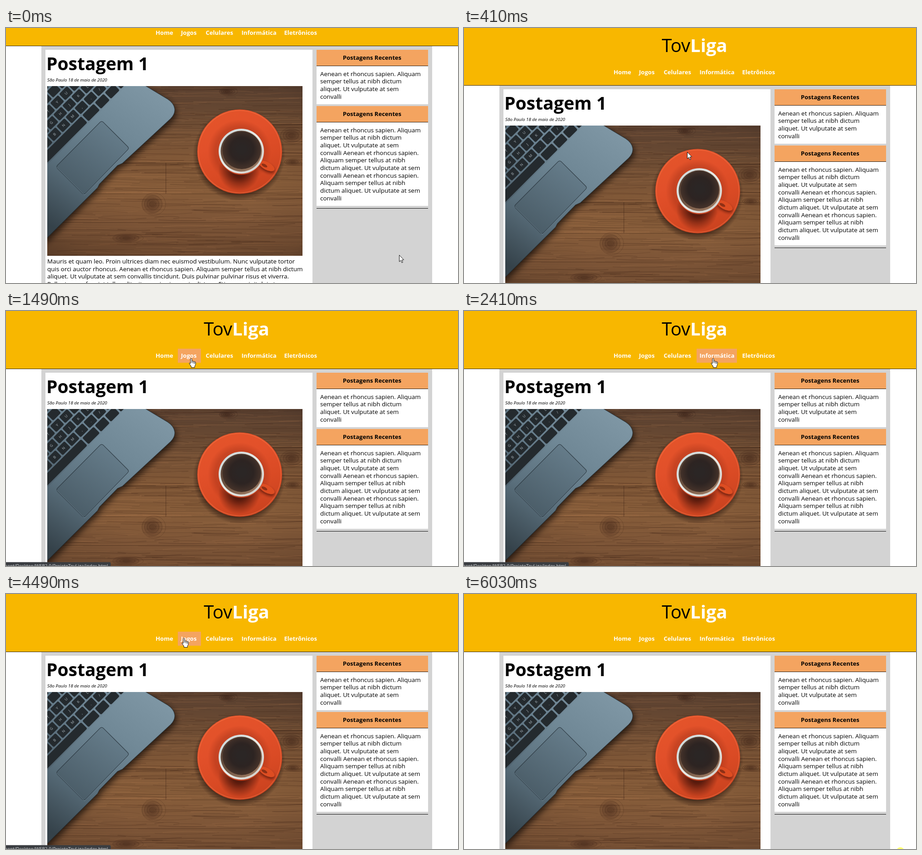
Write an HTML page with a canvas that moves like this. It is 997 by 562 pixels and loops after 6.11 s.

```html
<!DOCTYPE html>
<html lang="pt-BR">
<head>
<meta charset="utf-8">
<title>Blog</title>
<style>
  html, body { margin: 0; width: 100%; height: 100%; overflow: hidden; background: #fff; }
  canvas { display: block; }
</style>
</head>
<body>
<canvas id="stage" width="997" height="562"></canvas>
<script>
const W = 997, H = 562, LOOP = 6110, SCROLL = 88;
const SANS = '"Open Sans", "Noto Sans", sans-serif';
const SAND = '#f4a460';
const ctx = document.getElementById('stage').getContext('2d');

const NAV = [
  { label: 'Home', x: 330, left: 323, right: 375 },
  { label: 'Jogos', x: 386, left: 379, right: 430 },
  { label: 'Celulares', x: 440.5, left: 434, right: 509 },
  { label: 'Informática', x: 519.5, left: 513, right: 602 },
  { label: 'Eletrônicos', x: 613.5, left: 607, right: 695 }
];

// Pointer path: time, x, y
const PATH = [
  [0, 866.5, 499.5], [410, 492, 273], [640, 424, 140], [1000, 362, 112],
  [1330, 350, 104], [1410, 377, 104], [1490, 408, 104], [1640, 408, 104],
  [2030, 470, 103], [2100, 470, 103], [2410, 549, 104], [2560, 549, 104],
  [2870, 650, 105], [3110, 650, 105], [3570, 573, 97], [3800, 550, 97],
  [4490, 392, 97], [4650, 378, 97], [4725, 378, 97], [4800, 364, 97],
  [5340, 934, 461], [5800, 968, 575], [LOOP, 968, 575]
];

function box(g, color, x, y, w, h) {
  g.fillStyle = color;
  g.fillRect(x, y, w, h);
}

function text(g, str, x, y, font, color = '#000', align = 'left') {
  g.font = font + ' ' + SANS;
  g.fillStyle = color;
  g.textAlign = align;
  g.fillText(str, x, y);
}

function poly(g, pts) {
  g.beginPath();
  pts.forEach(([x, y]) => g.lineTo(x, y));
  g.closePath();
}

function oval(g, fill, x, y, rx, ry = rx, turn = 0) {
  g.beginPath();
  g.ellipse(x, y, rx, ry, turn, 0, Math.PI * 2);
  g.fillStyle = fill;
  g.fill();
}

function ring(g, color, width, x, y, rx, ry = rx) {
  g.beginPath();
  g.ellipse(x, y, rx, ry, 0, 0, Math.PI * 2);
  g.strokeStyle = color;
  g.lineWidth = width;
  g.stroke();
}

function addStops(grad, colors) {
  colors.forEach((c, i) => grad.addColorStop(i / (colors.length - 1), c));
  return grad;
}

function blend(g, x0, y0, x1, y1, ...colors) {
  return addStops(g.createLinearGradient(x0, y0, x1, y1), colors);
}

function glow(g, x, y, r0, r1, ...colors) {
  return addStops(g.createRadialGradient(x, y, r0, x, y, r1), colors);
}

function randomFrom(seed) {
  return () => (seed = (seed * 16807) % 2147483647) / 2147483647;
}

function drawWood(g) {
  const rnd = randomFrom(77);
  box(g, blend(g, 0, 216, 0, 590, '#5a4030', '#6b4b33', '#7f5737', '#875d3a', '#7d5537', '#6a472e'), 91, 216, 563, 374);
  for (let i = 0; i < 520; i++) {
    const x = 40 + rnd() * 580, y = 216 + rnd() * 374, len = 50 + rnd() * 190;
    g.strokeStyle = rnd() < 0.5 ? 'rgba(50,28,16,.2)' : 'rgba(178,126,80,.16)';
    g.lineWidth = 0.5 + rnd() * 1.6;
    g.beginPath();
    g.moveTo(x, y);
    g.quadraticCurveTo(x + len / 2, y + rnd() * 10 - 5, x + len, y + rnd() * 6 - 3);
    g.stroke();
  }
  [300, 385, 453, 516].forEach(y => box(g, 'rgba(45,24,14,.35)', 91, y, 563, 1.2));
  box(g, 'rgba(45,24,14,.4)', 352, 385, 1.2, 68);
  [[487, 228, 13, 6], [629, 325, 18, 12], [322, 476, 17, 16], [265, 551, 22, 7], [632, 383, 14, 5]].forEach(([x, y, rx, ry]) => {
    for (let k = 1; k < 5; k++) {
      oval(g, 'rgba(50,27,16,.12)', x, y, rx * k / 3, ry * k / 3);
      ring(g, 'rgba(45,24,14,.22)', 1, x + k, y, rx * k / 2.6, ry * k / 2.6);
    }
  });
  box(g, glow(g, 400, 410, 150, 420, 'rgba(25,16,12,0)', 'rgba(25,16,12,.08)', 'rgba(25,16,12,.34)'), 91, 216, 563, 374);
}

function bodyShape(g) {
  g.beginPath();
  g.moveTo(80, 200);
  g.lineTo(282, 200);
  g.lineTo(357, 245);
  g.bezierCurveTo(375, 257, 377, 274, 363, 288);
  g.lineTo(257, 386);
  g.lineTo(246, 391);
  g.lineTo(206, 432);
  g.lineTo(202, 440);
  g.lineTo(80, 561);
  g.closePath();
}

function drawKeys(g) {
  const rows = ['', '/.,MNBVC', ';LKJHGF', 'POIUYT', '0987', ''];
  g.save();
  poly(g, [[80, 200], [280, 200], [262, 217], [91, 389], [80, 400]]);
  g.fillStyle = blend(g, 262, 217, 91, 388, '#788f9e', '#667c8a', '#4d5f6b');
  g.fill();
  g.clip();
  g.translate(262, 218);
  g.rotate(Math.PI * 0.75);
  const key = (x, y, w, label) => {
    g.beginPath();
    g.roundRect(x, y, w, 19.5, 3);
    g.fillStyle = '#242a2e';
    g.fill();
    if (!label) return;
    g.save();
    g.translate(x + w / 2, y + 10);
    g.rotate(Math.PI);
    text(g, label, 0, 3, '8px', '#aab5bc', 'center');
    g.restore();
  };
  [[-18, 27], [13, 27], [44, 27], [75, 35], [114, 140]].forEach(([x, w]) => key(x, 3, w));
  rows.forEach((row, r) => {
    if (r === 0) return;
    const start = 31 - (r - 1) * 13, y = 3 + r * 23;
    key(start - 54, y, 50);
    for (let i = 0; i < 9; i++) key(start + i * 28, y, 24.5, row[i]);
  });
  g.restore();
}

function drawLaptop(g) {
  g.save();
  g.shadowColor = 'rgba(18,10,6,.75)';
  g.shadowBlur = 14;
  g.shadowOffsetX = 4;
  g.shadowOffsetY = 6;
  bodyShape(g);
  g.fillStyle = blend(g, 335, 225, 115, 535, '#7f97a5', '#708896', '#5a6f7c', '#35424a');
  g.fill();
  g.restore();
  g.strokeStyle = 'rgba(30,40,46,.7)';
  g.lineWidth = 1.2;
  g.stroke();
  drawKeys(g);

  const pad = [[211, 292], [272, 353], [172, 456], [110, 394]];
  g.beginPath();
  g.moveTo(240, 321);
  pad.forEach((p, i) => {
    const next = pad[(i + 1) % 4];
    if (i) g.arcTo(...p, ...next, 5);
  });
  g.arcTo(...pad[0], ...pad[1], 5);
  g.closePath();
  g.fillStyle = blend(g, 240, 300, 140, 440, '#677e8c', '#4a5c67');
  g.fill();
  g.strokeStyle = '#303d46';
  g.lineWidth = 1.2;
  g.stroke();
  g.strokeStyle = 'rgba(150,174,188,.45)';
  g.lineWidth = 1;
  g.beginPath();
  g.moveTo(271, 355);
  g.lineTo(173, 456);
  g.lineTo(112, 395);
  g.stroke();
}

function drawCup(g) {
  oval(g, glow(g, 514, 367, 84, 102, 'rgba(25,12,8,.65)', 'rgba(25,12,8,0)'), 514, 367, 102);
  oval(g, blend(g, 470, 270, 550, 453, '#e4542a', '#e2502a', '#d94a24', '#c9421f'), 515.5, 360.5, 93.5, 93);
  ring(g, 'rgba(255,140,90,.4)', 1.2, 515.5, 360.5, 91, 90.5);
  oval(g, glow(g, 515, 360, 54, 70, 'rgba(120,30,12,.25)', 'rgba(120,30,12,0)'), 515, 360, 70);
  oval(g, glow(g, 514, 402, 14, 46, 'rgba(70,20,10,.85)', 'rgba(70,20,10,0)'), 514, 402, 46);
  g.save();
  g.shadowColor = 'rgba(70,15,5,.7)';
  g.shadowBlur = 6;
  g.shadowOffsetY = 4;
  oval(g, '#dd4d22', 575, 392, 19, 8.5, 0.5);
  g.restore();
  oval(g, '#8f3015', 570, 391, 7, 3, 0.5);
  oval(g, '#c44422', 519, 361.5, 50, 50);
  oval(g, blend(g, 480, 320, 560, 400, '#cfd9da', '#e9ebe7', '#d3d0cb'), 519, 359.5, 50, 49.5);
  oval(g, blend(g, 480, 320, 545, 400, '#4d3b31', '#6d5240', '#9a7860'), 519, 359.5, 45.5, 45);
  oval(g, glow(g, 520, 355, 8, 44, '#2b2625', '#2d2422', '#46332a'), 520, 357.5, 42.5, 41.5);
}

function drawPhoto(g) {
  g.save();
  g.beginPath();
  g.rect(91, 216, 563, 374);
  g.clip();
  drawWood(g);
  drawLaptop(g);
  drawCup(g);
  g.restore();
}

function drawCard(g, y, lines) {
  const bottom = Math.round(y + 53 + lines.length * 16.7);
  box(g, SAND, 685, y, 246, 35);
  box(g, '#2a1c10', 685, y + 35, 246, 1);
  box(g, '#fff', 685, y + 36, 246, bottom - y - 36);
  text(g, 'Postagens Recentes', 807.5, y + 22, 'bold 13.05px', '#000', 'center');
  lines.forEach((line, i) => text(g, line, 693, y + 57.5 + i * 16.7, '13.46px'));
}

function drawTitle(g) {
  const parts = [['Tov', '500 40px', '#000'], ['Liga', 'bold 40px', '#fff']];
  const widths = parts.map(([str, font]) => {
    g.font = font + ' ' + SANS;
    return g.measureText(str).width;
  });
  let x = 508.5 - (widths[0] + widths[1]) / 2;
  parts.forEach(([str, font, color], i) => {
    text(g, str, x, 53.5, font, color);
    x += widths[i];
  });
}

function makePage() {
  const layer = document.createElement('canvas');
  layer.width = W;
  layer.height = H + SCROLL;
  const g = layer.getContext('2d');
  box(g, '#fff', 0, 0, W, layer.height);
  box(g, '#f8b700', 0, 0, W, 127);
  box(g, '#d3d3d3', 78, 128, 862, 530);
  box(g, '#fff', 87, 136, 589, 520);
  box(g, '#33260a', 0, 127, W, 1);

  drawTitle(g);
  text(g, 'Postagem 1', 89, 181, 'bold 39.2px');
  text(g, 'São Paulo 18 de maio de 2020', 91, 206, 'italic 9.85px');
  drawPhoto(g);
  [
    'Mauris et quam leo. Proin ultrices diam nec euismod vestibulum. Nunc vulputate tortor',
    'quis orci auctor rhoncus. Aenean et rhoncus sapien. Aliquam semper tellus at nibh dictum',
    'aliquet. Ut vulputate at sem convallis tincidunt. Duis pulvinar pulvinar risus et viverra.',
    'Pellentesque feugiat tellus elit, vitae varius ipsum in dictum. Etiam suscipit dui at ex'
  ].forEach((line, i) => text(g, line, 91, 607 + i * 16.7, '13.46px'));

  const intro = ['Aenean et rhoncus sapien. Aliquam', 'semper tellus at nibh dictum', 'aliquet. Ut vulputate at sem'];
  const more = ['convalli Aenean et rhoncus sapien.', 'Aliquam semper tellus at nibh', 'dictum aliquet. Ut vulputate at sem'];
  drawCard(g, 136, [...intro, 'convalli']);
  drawCard(g, 260, [...intro, ...more, ...more, 'convalli']);
  box(g, '#111', 685, 485, 246, 1);
  return layer;
}

function pointerAt(t) {
  const i = Math.max(1, PATH.findIndex(p => p[0] >= t));
  const [t0, x0, y0] = PATH[i - 1], [t1, x1, y1] = PATH[i];
  const p = (t - t0) / (t1 - t0), e = p * p * (3 - 2 * p);
  return { x: x0 + (x1 - x0) * e, y: y0 + (y1 - y0) * e };
}

function drawPointer(g, { x, y }, hand) {
  g.save();
  g.translate(Math.round(x) + 0.5, Math.round(y) + 0.5);
  if (hand) {
    g.beginPath();
    g.moveTo(-1.5, 1);
    g.quadraticCurveTo(0, -1.5, 1.5, 1);
    g.lineTo(1.5, 6);
    g.quadraticCurveTo(3.5, 4.5, 4.5, 6.8);
    g.quadraticCurveTo(6.5, 5.5, 7.3, 7.6);
    g.quadraticCurveTo(9.8, 6.8, 9.8, 9.5);
    g.lineTo(9.5, 14);
    g.lineTo(7.8, 17);
    g.lineTo(7.8, 20);
    g.lineTo(0, 20);
    g.lineTo(0, 17.5);
    g.lineTo(-4.2, 11.5);
    g.quadraticCurveTo(-4.5, 8.8, -1.5, 11.2);
    g.closePath();
  } else {
    poly(g, [[0, 0], [0, 14.5], [3.3, 11.5], [5.6, 16.8], [7.8, 15.8], [5.6, 10.7], [10, 10.4]]);
  }
  g.fillStyle = '#fff';
  g.fill();
  g.strokeStyle = '#111';
  g.lineWidth = 1;
  g.lineJoin = 'round';
  g.stroke();
  if (hand) {
    g.beginPath();
    [[1.5, 6], [4.5, 7], [7.3, 8]].forEach(([px, py]) => {
      g.moveTo(px, py);
      g.lineTo(px, py + 4);
    });
    g.stroke();
  }
  g.restore();
}

function drawStatus(g) {
  g.beginPath();
  g.roundRect(-4, 553.5, 235, 20, [0, 3, 0, 0]);
  g.fillStyle = '#3a3d41';
  g.fill();
  text(g, 'ment/Desktop/WEB2.0/ProjetoTovLiga/index.html', 225, 566, '10px', '#d4d7da', 'right');
}

function tick(t) {
  return t < 410 ? Math.floor(t / 68.4) * 68.4 : 410 + 77 * Math.floor((t - 406) / 77);
}

const page = makePage();

function draw(now) {
  const t = tick(now % LOOP);
  const left = 1 - Math.min(1, Math.max(0, (t - 30) / 420));
  const scroll = Math.round(SCROLL * left * left);
  const pointer = pointerAt(t);
  const inRow = pointer.y + scroll >= 83 && pointer.y + scroll <= 114;
  const active = inRow && NAV.find(n => pointer.x >= n.left && pointer.x <= n.right);

  ctx.drawImage(page, 0, -scroll);
  if (active) box(ctx, SAND, active.left, 83 - scroll, active.right - active.left, 31);
  NAV.forEach(n => text(ctx, n.label, n.x, 103 - scroll, 'bold 13.1px', '#fff'));
  if (t > 850 && t < 5450) drawStatus(ctx);
  if (t > 6000) oval(ctx, '#ffff70', 962.5, 567, 9);
  drawPointer(ctx, pointer, active);
  requestAnimationFrame(() => draw(performance.now()));
}

draw(0);
</script>
</body>
</html>
```
